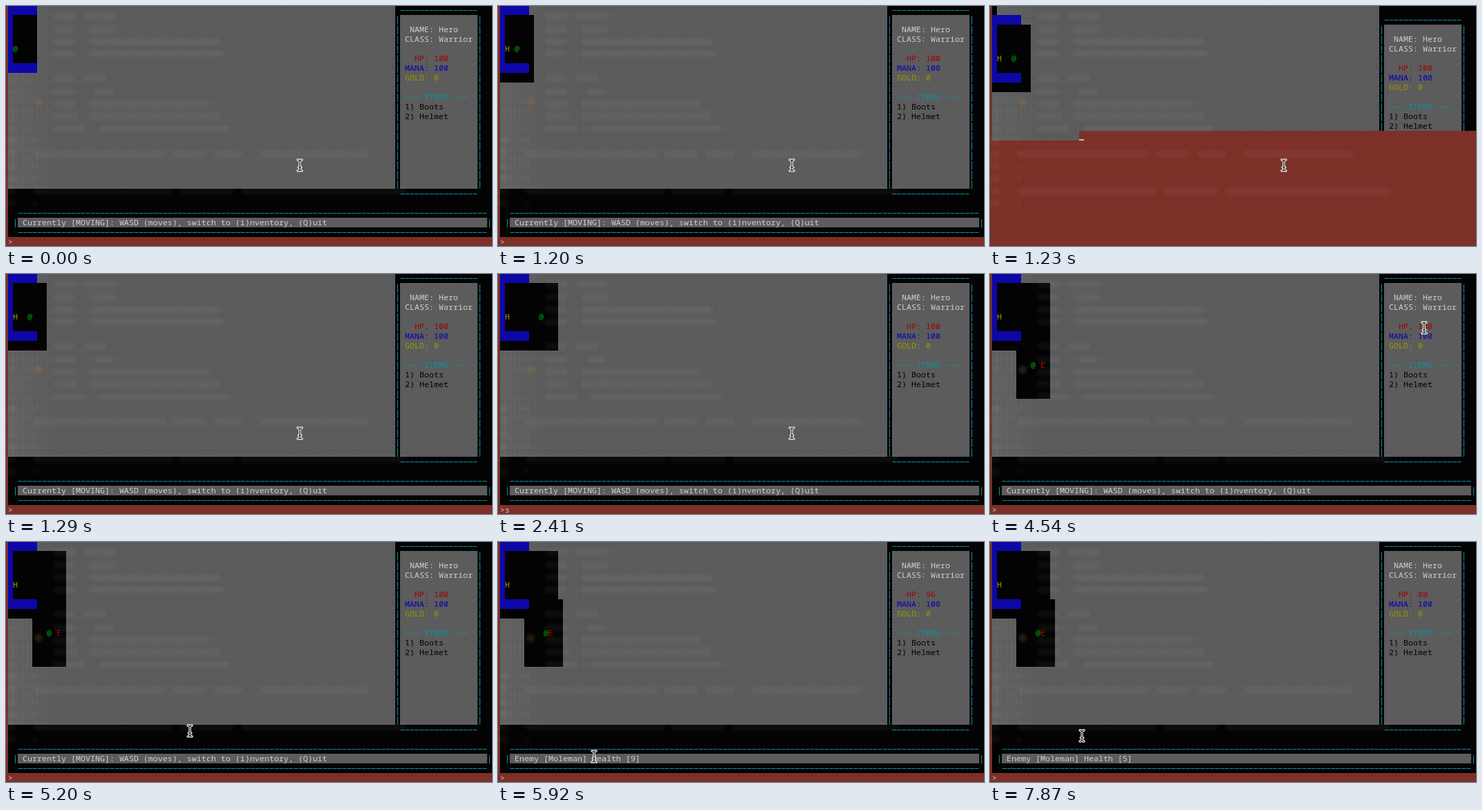
Write an HTML page that moves like this. It is 703x348 px and loops after 8000 ms.

```html
<!DOCTYPE html>
<html lang="en">
<head>
<meta charset="utf-8">
<title>Terminal dungeon</title>
<style>
  html, body { margin: 0; width: 100%; height: 100%; overflow: hidden; background: #7d3028; }
  svg { display: block; width: 100vw; height: 100vh; }
  text { font: 11.667px "Noto Sans Mono", "DejaVu Sans Mono", monospace; white-space: pre; }
  .rule { stroke: #0b929f; stroke-width: 1; fill: none; }
</style>
</head>
<body>
<svg viewBox="0 0 703 348" xmlns="http://www.w3.org/2000/svg">
  <defs>
    <pattern id="fog" width="7" height="14" x="3" y="-1" patternUnits="userSpaceOnUse">
      <path d="M1.5 4.5Q3.5 2 5 4.5L3.4 7V8.5M3.4 10v1" stroke="#545454" stroke-width=".9" fill="none"/>
    </pattern>
    <linearGradient id="shade">
      <stop offset="0" stop-color="#646464"/>
      <stop offset=".12" stop-color="#5c5c5c"/>
    </linearGradient>
    <filter id="soft" x="-5%" y="-10%" width="110%" height="120%"><feGaussianBlur stdDeviation="2"/></filter>
    <clipPath id="partial"><path d="M0 0H703V181H129V195H0Z"/></clipPath>
    <path id="beam" d="M-3 -8Q-.6 -8 0 -6Q.6 -8 3 -8M0 -6V6M-3 8Q-.6 8 0 6Q.6 8 3 8M-1.8 3H1.8"/>
  </defs>
  <rect width="703" height="348" fill="#7d3028"/>
  <g id="window"><g id="screen">
    <rect x="3" y="-14" width="700" height="349" fill="#030303"/>
    <path d="M10 -14H563V265H3V-1H10Z" fill="url(#shade)"/>
    <path d="M10 -14H563V265H3V-1H10Z" fill="url(#fog)"/>
    <path id="seen" fill="#030303"/>
    <path d="M3 -1H45V13H10V83H45V97H3Z" fill="#0d07a8"/>
    <rect x="570" y="13" width="112" height="252" fill="#5c5c5c"/>
    <rect x="17" y="307" width="679" height="14" fill="#5c5c5c"/>
    <path class="rule" stroke-dasharray="6 1"
      d="M570.5 6.5H682M570.5 272.5H682M17.5 300.5H696M17.5 328.5H696M577.5 132.5H598M647.5 132.5H668"/>
    <path class="rule" stroke-dasharray="12 2"
      d="M566.5 15V265M685.5 15V265M13.5 309V321M699.5 309V321"/>
    <g id="labels"></g>
  </g></g>
  <rect id="caret" x="129" y="193.5" width="7" height="1.3" fill="#fff"/>
  <g id="ghosts" filter="url(#soft)"></g>
  <g id="mouse" fill="none" stroke-linecap="round">
    <use href="#beam" stroke="#fff" stroke-width="3.4"/>
    <use href="#beam" stroke="#111" stroke-width="1.2"/>
  </g>
</svg>
<script>
(() => {
  const LOOP = 8000, CELL_W = 7, CELL_H = 14, SIGHT = 3;
  const ENEMY = { col: 10, row: 9 };
  const NS = "http://www.w3.org/2000/svg";
  const $ = id => document.getElementById(id);
  const cellX = col => 3 + col * CELL_W;
  const cellY = row => row * CELL_H - 1;
  const baseline = row => cellY(row) + 11;

  function add(parent, tag, attrs) {
    const node = document.createElementNS(NS, tag);
    for (const key in attrs) node.setAttribute(key, attrs[key]);
    return parent.appendChild(node);
  }

  function label(col, row, fill, content = "") {
    const node = add($("labels"), "text", { x: cellX(col), y: baseline(row), fill });
    node.textContent = content;
    return node;
  }

  const WHITE = "#d0d0d0", RED = "#a00000", GOLD = "#989800";
  label(83, 2, WHITE, "NAME: Hero");
  label(82, 3, WHITE, "CLASS: Warrior");
  const hpText = label(84, 5, RED);
  label(82, 6, "#0a00b4", "MANA: 100");
  label(82, 7, GOLD, "GOLD: 0");
  label(86, 9, "#0b929f", "ITEMS");
  label(82, 10, "#000", "1) Boots");
  label(82, 11, "#000", "2) Helmet");
  const statusText = label(3, 22, WHITE);
  const promptText = label(0, 24, "#dcc8c4");
  const healer = label(1, 4, GOLD, "H");
  const enemy = label(ENEMY.col, ENEMY.row, "#b40000", "E");
  const hero = label(1, 4, "#00a800", "@");

  // Key presses: key, time it is echoed, time the screen answers
  const presses = [
    ["d", 780, 810], ["d", 1200, 1200], ["d", 1230, 1230], ["d", 1380, 1410],
    ["d", 1580, 1610], ["d", 1760, 1780], ["d", 1990, 2020],
    ["s", 2410, 2440], ["s", 2590, 2620], ["s", 2770, 2800], ["s", 2980, 3010], ["s", 3430, 3460],
    ["d", 5470, 5500], ["d", 5890, 5920], ["d", 6190, 6210], ["d", 6540, 6570],
    ["d", 7450, 7480], ["d", 7840, 7870]
  ];

  // Pointer waypoints: time, x, y
  const pointer = [
    [0, 425, 231], [3850, 425, 231], [4020, 397, 212], [4420, 634, 75], [4540, 628, 78],
    [4600, 631, 80], [4660, 631, 80], [5440, 161, 330], [5710, 139, 311],
    [7110, 139, 311], [7300, 133, 281], [LOOP, 133, 281]
  ];

  // Blurred text behind the translucent window: y, then start and width pairs
  const ghostRows = [
    [15, 68, 34, 112, 48], [33, 68, 32, 120, 40], [51, 68, 32, 120, 190], [69, 68, 32, 120, 196],
    [104, 68, 32, 112, 34], [124, 68, 32, 128, 28], [142, 68, 34, 120, 175], [159, 68, 36, 120, 190],
    [177, 68, 48, 134, 190], [214, 42, 190, 240, 50, 300, 42, 366, 160], [268, 42, 200, 250, 80, 340, 240]
  ];
  const ghosts = $("ghosts");
  for (const [y, ...spans] of ghostRows) {
    for (let i = 0; i < spans.length; i += 2) {
      add(ghosts, "rect", { x: spans[i], y: y - 5, width: spans[i + 1], height: 11, rx: 5, fill: "#fff", opacity: .045 });
    }
  }
  for (let y = 196; y < 290; y += 18) {
    add(ghosts, "ellipse", { cx: 8, cy: y, rx: 7, ry: 6, fill: "#fff", opacity: .04 });
    add(ghosts, "circle", { cx: 42, cy: y, r: 4, fill: "#fff", opacity: .03 });
  }
  add(ghosts, "circle", { cx: 47, cy: 139, r: 6, fill: "#c08030", opacity: .2 });

  function sightRect(col, row) {
    const x = cellX(Math.max(0, col - SIGHT)), y = cellY(Math.max(0, row - SIGHT));
    return `M${x} ${y}H${cellX(col + SIGHT + 1)}V${cellY(row + SIGHT + 1)}H${x}Z`;
  }

  function gameAt(t) {
    const game = { col: 1, row: 4, hits: 0, typed: "", seen: sightRect(2, 3), enemySeen: false };
    for (const [key, echo, done] of presses) {
      if (t >= echo && t < done) game.typed = key;
      if (t < done) break;
      const col = game.col + (key === "d"), row = game.row + (key === "s");
      if (col === ENEMY.col && row === ENEMY.row) { game.hits++; continue; }
      game.col = col;
      game.row = row;
      game.seen += sightRect(col, row);
      if (Math.abs(col - ENEMY.col) <= SIGHT && Math.abs(row - ENEMY.row) <= SIGHT) game.enemySeen = true;
    }
    return game;
  }

  function pointerAt(t) {
    const i = pointer.findIndex(p => p[0] > t);
    const [t0, x0, y0] = pointer[i - 1], [t1, x1, y1] = pointer[i];
    const u = (t - t0) / (t1 - t0), ease = u * u * (3 - 2 * u);
    return [x0 + (x1 - x0) * ease, y0 + (y1 - y0) * ease];
  }

  const show = (node, on) => node.setAttribute("visibility", on ? "visible" : "hidden");

  function render(t) {
    const game = gameAt(t);
    $("seen").setAttribute("d", game.seen);
    hero.setAttribute("x", cellX(game.col));
    hero.setAttribute("y", baseline(game.row));
    show(healer, game.col > 1);
    show(enemy, game.enemySeen);
    hpText.textContent = "HP: " + (100 - 4 * game.hits);
    statusText.textContent = game.hits
      ? `Enemy [Moleman] Health [${10 - game.hits}]`
      : "Currently [MOVING]: WASD (moves), switch to (i)nventory, (Q)uit";
    promptText.textContent = ">" + game.typed;

    // One redraw is caught halfway, a line lower and not yet complete
    const halfDrawn = t >= 1230 && t < 1290;
    $("screen").setAttribute("transform", `translate(0 ${halfDrawn ? CELL_H : 0})`);
    $("window").setAttribute("clip-path", halfDrawn ? "url(#partial)" : "none");
    show($("caret"), halfDrawn);
    $("mouse").setAttribute("transform", `translate(${pointerAt(t).map(Math.round).join(" ")})`);
  }

  const start = performance.now();
  function tick() {
    render(Math.max(0, performance.now() - start) % LOOP);
    requestAnimationFrame(tick);
  }
  tick();
})();
</script>
</body>
</html>
```
